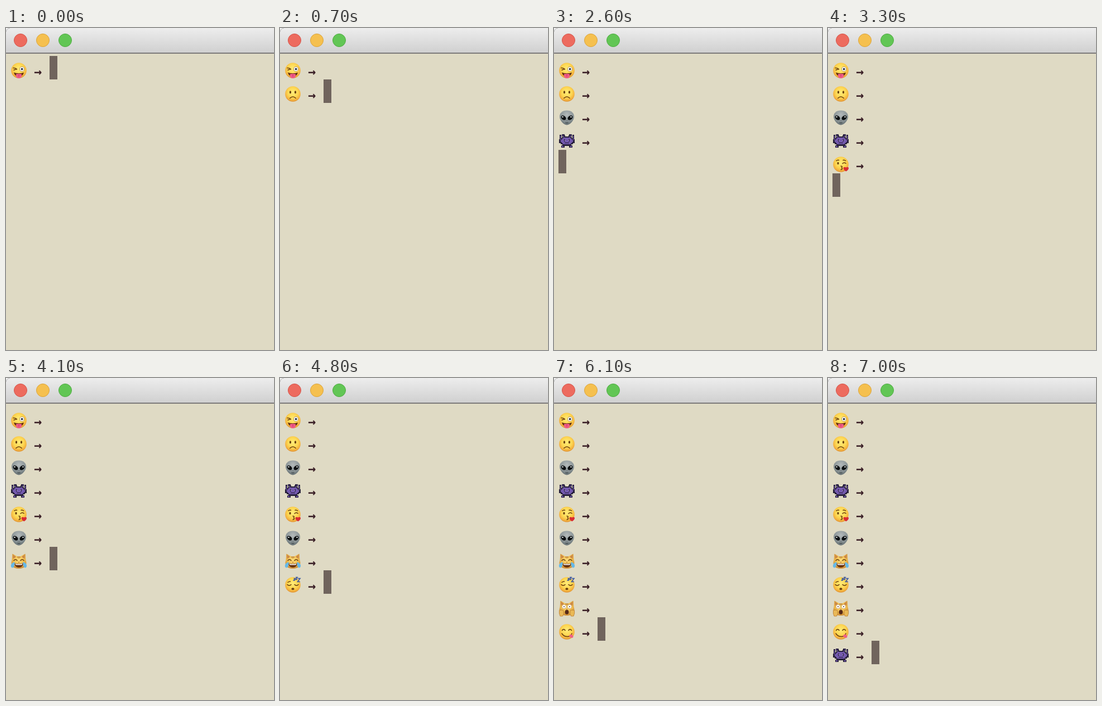
An HTML page for the animation above (7.1 s loop, 480 by 576 pixels).

```html
<!DOCTYPE html>
<html lang="en">
<head>
<meta charset="utf-8">
<title>Emoji prompt</title>
<style>
  html, body { margin: 0; width: 100%; height: 100%; overflow: hidden; background: #dfdac4; }
  svg { display: block; width: 480px; height: 576px; }
  .arrow { font: bold 23.25px "DejaVu Sans Mono", monospace; fill: #3b2027; }
  .ink { fill: none; stroke: #693c0e; stroke-width: 1.5; stroke-linecap: round; stroke-linejoin: round; }
  #rows { animation: reveal 7.1s step-end infinite; }
  #cursor { fill: #70645d; animation: move 7.1s step-end infinite; }

  /* The prompt is printed a moment after some of the line breaks. */
  @keyframes reveal {
    0% { clip-path: inset(0 0 484px 0); }
    8.45% { clip-path: inset(0 0 442px 0); }
    16.901% { clip-path: inset(0 0 400px 0); }
    28.169% { clip-path: inset(0 0 358px 0); }
    38.028% { clip-path: inset(0 0 316px 0); }
    47.887% { clip-path: inset(0 0 274px 0); }
    56.338% { clip-path: inset(0 0 232px 0); }
    66.197% { clip-path: inset(0 0 190px 0); }
    73.239% { clip-path: inset(0 0 148px 0); }
    83.098% { clip-path: inset(0 0 106px 0); }
    91.549%, 100% { clip-path: inset(0 0 64px 0); }
  }
  @keyframes move {
    0% { transform: translate(78px, 50px); }
    8.45% { transform: translate(78px, 92px); }
    16.901% { transform: translate(78px, 134px); }
    26.76% { transform: translate(8px, 176px); }
    28.169% { transform: translate(78px, 176px); }
    36.619% { transform: translate(8px, 218px); }
    38.028% { transform: translate(78px, 218px); }
    46.478% { transform: translate(8px, 260px); }
    47.887% { transform: translate(78px, 260px); }
    54.929% { transform: translate(8px, 302px); }
    56.338% { transform: translate(78px, 302px); }
    64.788% { transform: translate(8px, 344px); }
    66.197% { transform: translate(78px, 344px); }
    73.239% { transform: translate(78px, 386px); }
    83.098% { transform: translate(78px, 428px); }
    91.549%, 100% { transform: translate(78px, 470px); }
  }
</style>
</head>
<body>
<svg viewBox="0 0 480 576">
  <defs>
    <linearGradient id="bar" x2="0" y2="1">
      <stop stop-color="#ededed"/><stop offset="1" stop-color="#d0d0d0"/>
    </linearGradient>
    <radialGradient id="gold" cy=".4" r=".61">
      <stop stop-color="#ffeb78"/><stop offset=".55" stop-color="#fdd651"/>
      <stop offset=".85" stop-color="#f2ae3d"/><stop offset="1" stop-color="#d98a2c"/>
    </radialGradient>
    <radialGradient id="fur" cy=".4" r=".62">
      <stop stop-color="#fbdc7a"/><stop offset=".6" stop-color="#f0bd4e"/><stop offset="1" stop-color="#c98532"/>
    </radialGradient>
    <radialGradient id="skin" cy=".3" r=".75">
      <stop stop-color="#b4babb"/><stop offset=".6" stop-color="#8b9496"/><stop offset="1" stop-color="#596467"/>
    </radialGradient>

    <circle id="face" r="13.8" fill="url(#gold)"/>
    <path id="heart" d="M0 5C-7 1-5.5-5 0-2C5.5-5 7 1 0 5Z" fill="#d92c33"/>
    <g id="cathead">
      <path d="M-11.5-13.5L-3-9H3L11.5-13.5L12.5-2C16 8 9 13 0 13S-16 8-12.5-2Z" fill="url(#fur)"/>
      <path d="M-10.3-11.5L-5-8.2L-10.2-4.5ZM10.3-11.5L5-8.2L10.2-4.5Z" fill="#c9854a"/>
      <path d="M-2-9V-6M0-9V-5M2-9V-6" stroke="#ad6d2b" fill="none"/>
    </g>

    <g id="wink">
      <use href="#face"/>
      <path class="ink" d="M-10-4.5Q-6-5-3.5-2.2Q-6-2.2-9-.8"/>
      <circle cx="5.6" cy="-2.5" r="4.2" fill="#fff" stroke="#a97a37" stroke-width=".8"/>
      <circle cx="5.6" cy="-2.5" r="2" fill="#35404c"/>
      <path d="M-9 3.5Q0 6.5 9 3.5Q7.500 10.500 0 10.500T-9 3.5Z" fill="#65300f"/>
      <path d="M-5 6.500Q0 4.800 5 6.500V9.500C5 15.500-5 15.500-5 9.500Z" fill="#ef5b86"/>
      <path d="M0 7V11" stroke="#c73663"/>
    </g>
    <g id="frown">
      <use href="#face"/>
      <g fill="#69400f"><ellipse cx="-4.500" cy="-3.200" rx="1.600" ry="2.600"/><ellipse cx="4.500" cy="-3.200" rx="1.600" ry="2.600"/></g>
      <path class="ink" d="M-5.200 7.500Q0 2.600 5.200 7.500"/>
    </g>
    <g id="alien">
      <path d="M0-12.600C8-12.600 13.200-8 13-1C12.800 5 6 13.500 0 13.500S-12.800 5-13-1C-13.200-8-8-12.600 0-12.600Z" fill="url(#skin)"/>
      <g id="alieneye">
        <ellipse cx="-6" cy=".6" rx="5" ry="3.500" transform="rotate(35 -6 .6)" fill="#0c0f11"/>
        <ellipse cx="-7.500" cy="-1" rx="1.500" ry="1.100" fill="#eef1f2"/>
      </g>
      <use href="#alieneye" transform="scale(-1 1)"/>
      <path d="M-1.200 5.500V6.500M1.200 5.500V6.500M-2.500 9.300Q0 10.300 2.500 9.300" fill="none" stroke="#30393c"/>
    </g>
    <g id="monster">
      <g id="half">
        <path d="M0-8H-3V-10H-4V-12H-9V-8H-7V-7H-9V-5H-10V-11H-13V-3H-14V4H-11V6H-8V8H-10V12H-4V9H0Z" fill="#27203b"/>
        <path d="M0-6H-5V-9H-7V-11H-8V-9H-6V-5H-8V-3H-10V-1H-12V-9H-11V2H-9V4H-7V6H0ZM-9 9H-6V11H-9Z" fill="#745aae"/>
        <path d="M-5-3H-3V1H-5ZM-4 3H0V4H-4Z" fill="#211835"/>
        <path d="M-4-2H-3V0H-4Z" fill="#b6a5d7"/>
      </g>
      <use href="#half" transform="scale(-1 1)"/>
    </g>
    <g id="kiss">
      <use href="#face"/>
      <ellipse cx="-5" cy="-2" rx="1.600" ry="2.300" fill="#69400f"/>
      <path class="ink" d="M3-1.500Q5.800-4.200 9-1.800M-8-6.500Q-6-8.500-3.500-7.500M4-7.500Q6.500-8.500 8.500-6.500M0 3Q4 3.300 1.300 5.800Q4.500 8 .2 9.500"/>
      <use href="#heart" x="9.300" y="7.500"/>
    </g>
    <g id="joycat">
      <use href="#cathead"/>
      <path class="ink" d="M-9-1.500Q-6-5-3-1.500M3-1.500Q6-5 9-1.500"/>
      <path d="M-1.500 1H1.500L0 2.500Z" fill="#9c4e35"/>
      <path d="M-8 3.500Q0 5 8 3.500Q7 11 0 11T-8 3.500Z" fill="#65300f"/>
      <path d="M-6.500 4.200Q0 5.500 6.500 4.200L5.500 6.500H-5.500Z" fill="#fff"/>
      <path d="M-7.500 1C-14 3-15.500 8-13 11C-9 13-7 7-7.500 1ZM7.500 1C14 3 15.500 8 13 11C9 13 7 7 7.500 1Z" fill="#65b9e8"/>
    </g>
    <g id="sleep">
      <use href="#face"/>
      <path class="ink" d="M-10-.5Q-6.500 3-3-.5M3-.5Q6.500 3 10-.5M-9-4.500Q-7-6-4.500-6"/>
      <ellipse cy="7.200" rx="2.500" ry="2" fill="#69400f"/>
      <path d="M1.500-11.500H4L1.500-8H4M5-13.500H8L5-9.500H8M8.500-11.500H13L8.500-5.500H13" fill="none" stroke="#3c58a2" stroke-width="1.600"/>
    </g>
    <g id="scream">
      <use href="#cathead"/>
      <g fill="#fff" stroke="#bd8e49" stroke-width=".7"><circle cx="-5" cy="-3" r="3.700"/><circle cx="5" cy="-3" r="3.700"/></g>
      <g fill="#52341d"><circle cx="-5" cy="-3" r="1"/><circle cx="5" cy="-3" r="1"/></g>
      <path d="M-1.500 1H1.500L0 2.300Z" fill="#9c4e35"/>
      <ellipse cy="6.800" rx="3.500" ry="4" fill="#572918"/>
      <path id="paw" d="M-13.500 4Q-12.500 1-11 4Q-9.700 0-8.500 4Q-6.500 1-6 5Q-4.500 10-7.500 14H-12Q-14.500 9-13.500 4Z" fill="#eab957" stroke="#b87931" stroke-width=".8"/>
      <use href="#paw" transform="scale(-1 1)"/>
    </g>
    <g id="yum">
      <use href="#face"/>
      <path class="ink" d="M-8.500-2.500Q-5.500-6.500-3-2.500M3-2.500Q5.500-6.500 8.500-2.500M-9 3Q-5 9 2 8.500Q7 8 9 3"/>
      <path d="M3.500 7.500Q6.500 3.500 9 5Q13 8.500 10.500 10.500Q7.500 12 3.500 7.500Z" fill="#ef6084"/>
    </g>
  </defs>

  <rect width="480" height="576" fill="#dfdac4"/>
  <rect width="480" height="44" fill="url(#bar)"/>
  <rect y="44" width="480" height="2" fill="#7d7a7a"/>
  <path d="M0 0H7Q1 1 0 7Z" fill="#f4f4f4"/>
  <path d="M0 7Q1 1 7 0" fill="none" stroke="#b5b5b5"/>
  <circle cx="26" cy="22" r="11.500" fill="#ed6b5f" stroke="#d5554a"/>
  <circle cx="66" cy="22" r="11.500" fill="#f5c04f" stroke="#dba43c"/>
  <circle cx="106" cy="22" r="11.500" fill="#62c655" stroke="#4fac42"/>

  <g id="rows"><rect width="480" height="576" fill="none"/></g>
  <rect id="cursor" width="14" height="42"/>
</svg>
<script>
  const moods = ["wink", "frown", "alien", "monster", "kiss", "alien", "joycat", "sleep", "scream", "yum", "monster"];
  document.getElementById("rows").innerHTML += moods.map((mood, i) =>
    `<use href="#${mood}" x="23" y="${76 + 42 * i}"/><text class="arrow" x="50" y="${86 + 42 * i}">→</text>`
  ).join("");
</script>
</body>
</html>
```
